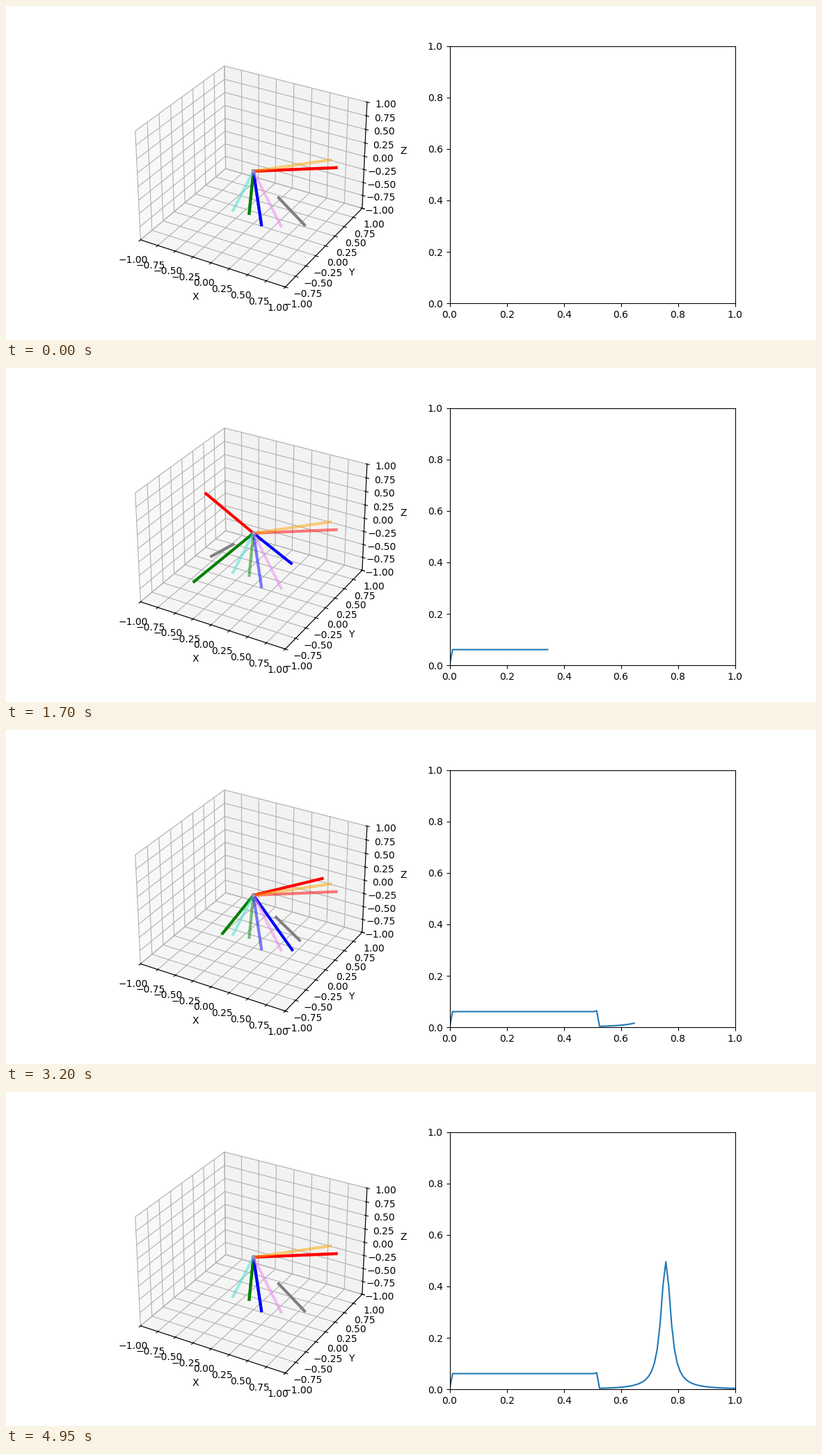
A matplotlib script for the animation above (5 s loop, 1164 px wide and 481 px high).

```python
import numpy as np
import matplotlib.pyplot as plt
from matplotlib.animation import FuncAnimation

FRAMES = 100
HALF = 49          # steps in each half of the loop
WIDTH = 3


def unit(v):
    v = np.asarray(v, float)
    return v / np.linalg.norm(v)


# Each pose is a half turn about an axis (a quaternion with no real part).
start = unit([1, 0.243, 0.053])
goal = unit([1, 0.15, 0.19])
arc = np.arccos(start @ goal)
side = unit(goal - start * (start @ goal))


def angle(k):
    """Angle along the great circle: slerp the long way, then nlerp back."""
    if k <= HALF + 1:
        return -(np.pi - arc) * k / HALF
    s = (k - HALF - 1) / HALF
    x = (1 - s) * -np.cos(arc) + s
    y = (1 - s) * -np.sin(arc)
    return np.arctan2(y, x)


def half_turn(axis):
    return 2 * np.outer(axis, axis) - np.eye(3)


def pose(theta):
    return half_turn(np.cos(theta) * start + np.sin(theta) * side)


theta = np.array([angle(k) for k in range(FRAMES)])
time = np.linspace(0, 1, FRAMES)
speed = np.concatenate([[0], np.abs(np.diff(theta))])

# The tiny extra height keeps 481 pixels from rounding down.
fig = plt.figure(figsize=(11.64001, 4.81001), dpi=100)
space = fig.add_subplot(1, 2, 1, projection="3d")
chart = fig.add_subplot(1, 2, 2)

space.set(xlim=(-1, 1), ylim=(-1, 1), zlim=(-1, 1),
          xlabel="X", ylabel="Y", zlabel="Z")
chart.set(xlim=(0, 1), ylim=(0, 1))


def segment(a, b, color, alpha=1):
    return space.plot(*np.transpose([a, b]), color=color, alpha=alpha,
                      linewidth=WIDTH)[0]


def triad(matrix, colors, alpha=1):
    return [segment(np.zeros(3), matrix[:, i], c, alpha)
            for i, c in enumerate(colors)]


rgb = ("red", "green", "blue")
diagonal = unit([1, 1, 1])
first = half_turn(start)

moving = triad(first, rgb)
pointer = segment(first @ diagonal / 2, first @ diagonal, "gray")
triad(first, rgb, 0.5)
triad(half_turn(goal), ("orange", "turquoise", "violet"), 0.5)
trace, = chart.plot([], [])


def update(k):
    matrix = pose(theta[k])
    for i, line in enumerate(moving):
        line.set_data_3d(*np.transpose([np.zeros(3), matrix[:, i]]))
    tip = matrix @ diagonal
    pointer.set_data_3d(*np.transpose([tip / 2, tip]))
    trace.set_data(time[:k + 1], speed[:k + 1])
    return [*moving, pointer, trace]


anim = FuncAnimation(fig, update, frames=FRAMES, interval=50,
                     repeat=True, repeat_delay=0, blit=False)
plt.show()
```
